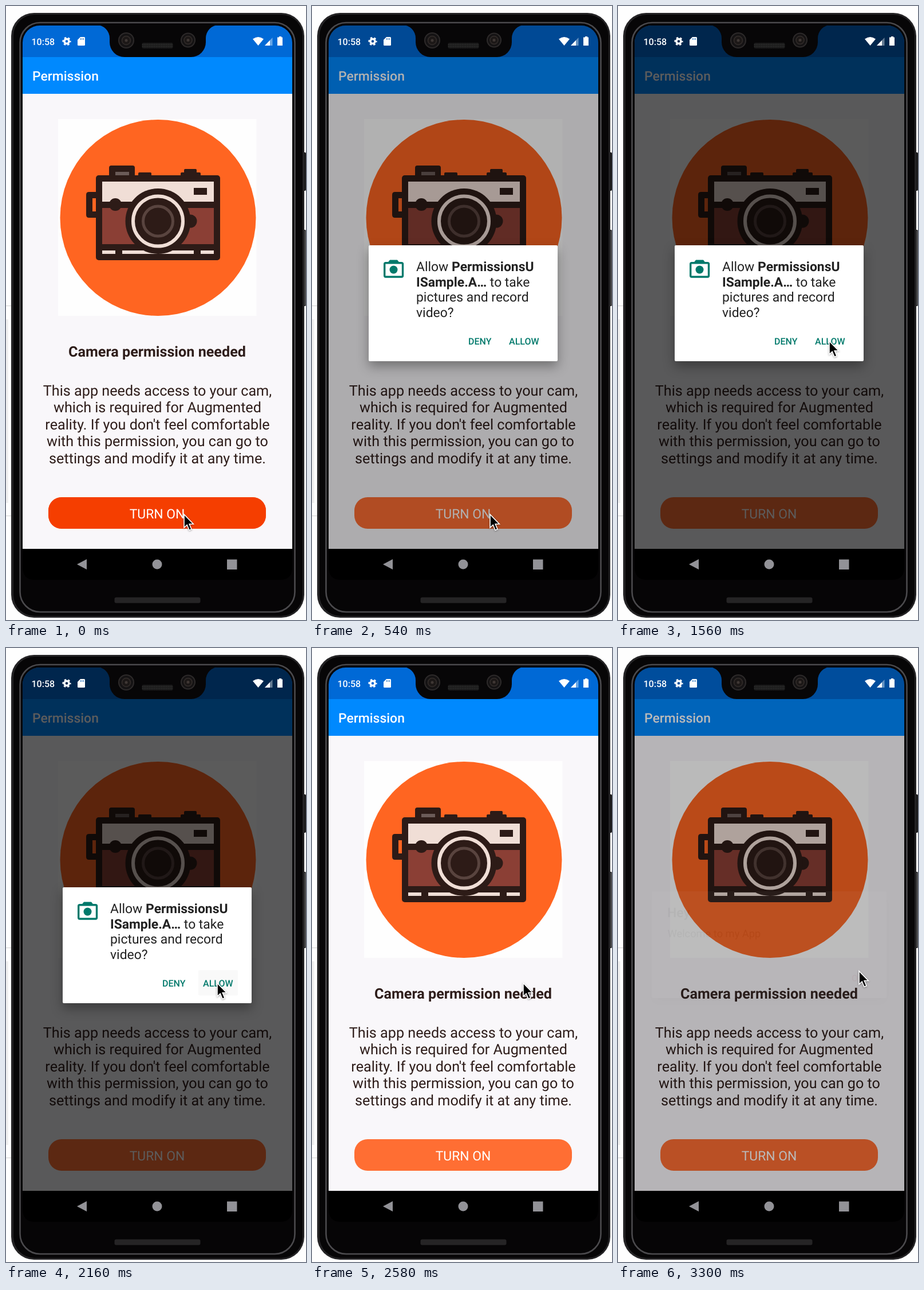
Write an HTML page that moves like this. It is 524 px wide and 1070 px high and loops after 3360 ms.

```html
<!DOCTYPE html>
<html lang="en">
<head>
<meta charset="utf-8">
<title>Camera permission</title>
<style>
  html, body { margin: 0; width: 100%; height: 100%; overflow: hidden; background: #fefefe; }
  svg { display: block; width: 524px; height: 1070px; font-family: Roboto, Arial, sans-serif; text-rendering: geometricPrecision; }
  .medium { font-weight: 500; }
  .bold { font-weight: 700; }
  .mid { text-anchor: middle; }
  .s16 { font-size: 16px; }
  .s18 { font-size: 18.3px; }
  .s23 { font-size: 22.9px; }
  .s25 { font-size: 25.18px; }
  .ink { fill: #2e1d1a; }
  .dark { fill: #2d1b17; }
  .cream { fill: #f0ded6; }
  .teal { fill: #00796b; }
  .card { fill: #fff; filter: drop-shadow(0 9px 10px rgba(0, 0, 0, .34)); }
</style>
</head>
<body>
<svg viewBox="0 0 524 1070" xmlns="http://www.w3.org/2000/svg">
  <defs>
    <clipPath id="screen"><path d="M29 946V64A30 30 0 0 1 59 34H470A30 30 0 0 1 500 64V946Z"/></clipPath>
    <pattern id="mesh" width="3" height="3" patternUnits="userSpaceOnUse">
      <rect width="3" height="3" fill="#1b1b1b"/><circle cx="1.5" cy="1.5" r=".8" fill="#383838"/>
    </pattern>
  </defs>

  <!-- window behind the phone -->
  <rect y="546" width="4" height="320" fill="#f0f0f0"/>
  <path d="M0 522.5H10M0 888.5H10" stroke="#d4d4d4"/>

  <!-- phone body -->
  <rect x="518" y="255" width="6" height="67" rx="2" fill="#1a1a1b"/>
  <rect x="518" y="390" width="6" height="133" rx="2" fill="#2c2c2e"/>
  <path d="M522.5 392V521" stroke="#6e6e70"/>
  <rect x="9" y="12" width="512" height="1054" rx="40" fill="#242325"/>
  <rect x="13" y="15" width="505" height="1048" rx="37" fill="#070607"/>
  <rect x="24.500" y="29" width="480" height="1027" rx="35" fill="#060506" stroke="#4b4a4d" stroke-width="2.600"/>

  <g clip-path="url(#screen)">
    <rect x="28" y="34" width="473" height="56" fill="#0069d6"/>
    <rect x="28" y="89" width="473" height="64" fill="#0089fe"/>
    <rect x="28" y="153" width="473" height="793" fill="#f9f7fa"/>
    <text class="medium s23" x="46" y="130" fill="#fff">Permission</text>

    <!-- camera picture -->
    <rect x="91" y="197" width="346.500" height="343" fill="#fefefe"/>
    <circle cx="265.500" cy="369" r="171" fill="#ff6521"/>
    <g class="dark">
      <path fill-rule="evenodd" d="M145 324H160V369H145Q140 369 140 364V329Q140 324 145 324ZM151 335V358H158V335Z"/>
      <rect x="180" y="278" width="45" height="24" rx="4"/>
      <rect x="231" y="290" width="23" height="10" rx="2"/>
      <rect x="305" y="290" width="35" height="10" rx="2"/>
      <rect x="311" y="284" width="22" height="10" rx="2"/>
      <rect x="157" y="295" width="217" height="148" rx="5"/>
    </g>
    <rect x="191" y="289" width="24" height="6" fill="#6b5b58"/>
    <rect class="cream" x="168" y="306" width="195" height="35"/>
    <rect x="168" y="352" width="195" height="63" fill="#8b3f35"/>
    <path d="M168 429H191M203 429H328M340 429H363" stroke="#f0ded6" stroke-width="6"/>
    <g class="dark">
      <rect x="328" y="317" width="23" height="12"/>
      <circle cx="191" cy="346" r="11"/>
      <circle cx="322" cy="375" r="11.500"/>
      <circle cx="265.500" cy="375" r="57"/>
    </g>
    <g fill="none" stroke-width="6">
      <circle cx="265.500" cy="375" r="43.500" stroke="#f0ded6"/>
      <circle cx="265.500" cy="375" r="26" stroke="#59443f" stroke-width="5"/>
    </g>

    <text class="bold s25 mid ink" x="264" y="611">Camera permission needed</text>
    <g id="body" class="s25 mid ink"></g>
    <rect x="74" y="856" width="380" height="55" rx="23" fill="#ff6e33"/>
    <rect id="press" x="74" y="856" width="380" height="55" rx="23" fill="#f53e00"/>
    <text class="s23 mid" x="264" y="893" fill="#fff">TURN ON</text>

    <rect id="shade" x="28" y="34" width="473" height="912"/>

    <g id="ask">
      <rect class="card" x="99" y="416.500" width="330" height="202" rx="2"/>
      <rect id="ripple" x="336" y="561" width="69" height="44" rx="2" fill="#f9f9f9"/>
      <path class="teal" d="M132 447L136 442H149L153 447Z"/>
      <rect x="126.700" y="447.200" width="31.800" height="24.300" rx="2" fill="none" stroke="#00796b" stroke-width="3.400"/>
      <circle class="teal" cx="142.500" cy="459" r="7"/>
      <g class="s23" fill="#212121">
        <text x="182" y="461">Allow <tspan class="bold">PermissionsU</tspan></text>
        <text x="182" y="488"><tspan class="bold">ISample.A…</tspan> to take</text>
        <text x="182" y="514.500">pictures and record</text>
        <text x="182" y="541.500">video?</text>
      </g>
      <g class="medium s16 teal">
        <text x="273" y="589">DENY</text>
        <text x="344" y="589">ALLOW</text>
      </g>
    </g>

    <g id="hello">
      <rect class="card" x="59" y="424" width="410" height="186" rx="2"/>
      <g fill="#212121">
        <text class="medium s23" x="86" y="469">Hey</text>
        <text class="s18" x="86.500" y="504">Welcome to my App</text>
      </g>
      <text class="medium s16" x="408" y="581" fill="#cf1b35">OK</text>
    </g>
  </g>

  <!-- status bar -->
  <g fill="#fff">
    <text class="medium s16" x="44.500" y="67.500">10:58</text>
    <circle cx="106" cy="61.500" r="4" fill="none" stroke="#fff" stroke-width="3.400"/>
    <circle cx="106" cy="61.500" r="6.400" fill="none" stroke="#fff" stroke-width="2.400" stroke-dasharray="3.400 3.300" stroke-dashoffset="1.700"/>
    <path d="M130 54H136.500Q138 54 138 55.500V67.500Q138 69 136.500 69H126.500Q125 69 125 67.500V59Z"/>
    <path d="M431 57.500Q440.500 50.500 450 57.500L440.500 69Z"/>
    <path d="M452 69L465.500 55V69Z" opacity=".4"/>
    <path d="M452 69L461 59.700V69Z"/>
    <path d="M477 53H481V54.500H483V69H474V54.500H477Z"/>
  </g>
  <path d="M130.500 56V59M133 56V59M135.500 56V59" stroke="#0058b0" stroke-width=".9"/>

  <!-- notch -->
  <path d="M158 33A23 23 0 0 1 181 56V63A26 26 0 0 0 207 89H323A26 26 0 0 0 349 63V56A23 23 0 0 1 372 33Z" fill="#070607"/>
  <g stroke="#2d2a2a" stroke-width="2" fill="#151314">
    <circle cx="210" cy="60" r="13"/><circle cx="318" cy="59.500" r="12"/>
  </g>
  <g stroke="#332d2b" stroke-width="1.500" fill="#1c1817">
    <circle cx="210" cy="60" r="7.500"/><circle cx="318" cy="59.500" r="7"/>
  </g>
  <circle cx="210" cy="60" r="2.500" fill="#3f3734"/>
  <circle cx="318" cy="59.500" r="2.500" fill="#3f3734"/>
  <rect x="237.500" y="64.500" width="54" height="9" rx="2" fill="url(#mesh)"/>

  <!-- navigation bar and chin -->
  <path d="M29 946H500V978Q500 1000 478 1000H51Q29 1000 29 978Z" fill="#000"/>
  <g fill="#929297">
    <path d="M124 973L141 964V982Z"/>
    <circle cx="264" cy="973" r="8.500"/>
    <rect x="386" y="964.500" width="17.500" height="17.500"/>
  </g>
  <rect x="189.500" y="1030.500" width="150" height="10" rx="3" fill="#252425"/>

  <path id="cursor" d="M0 0V23L5.200 18.300L9 27.500L13 25.800L9.200 16.800H16.300Z" fill="#000" stroke="#fff"
    stroke-width="1.600" style="filter:drop-shadow(0 1.500px 1.500px rgba(0,0,0,.35))"/>
</svg>
<script>
  const LOOP = 3360, STEP = 60, SHADE = 0.64;
  const $ = id => document.getElementById(id);

  const lines = [
    'This app needs access to your cam,',
    'which is required for Augmented',
    "reality. If you don't feel comfortable",
    'with this permission, you can go to',
    'settings and modify it at any time.'
  ];
  $('body').innerHTML = lines.map((line, i) =>
    `<text x="264.500" y="${679 + i * 29.45}">${line}</text>`).join('');

  // Each track holds [time, value] pairs.
  const tracks = {
    press: [[180, 1], [360, 0]],
    shade: [[420, 0], [540, .48], [600, .8], [660, 1], [2220, 1], [2340, .48], [2460, 0],
            [2700, 0], [2760, .3], [2820, .75], [2880, 1], [3180, 1], [3240, .8], [3300, .42], [3360, 0]],
    ask: [[420, 0], [540, 1], [2400, 1], [2460, 0]],
    drop: [[2220, .5], [2280, 60], [2340, 207.5], [2400, 400], [2460, 560]],
    ripple: [[2040, 0], [2160, 1]],
    hello: [[2700, 0], [2820, .6], [2880, 1], [3180, 1], [3240, .5], [3300, .03], [3360, 0]],
    toAllow: [[1080, 0], [1500, 1]],
    toOk: [[2940, 0], [3120, 1]]
  };

  function at(name, t) {
    const keys = tracks[name];
    const next = keys.findIndex(k => k[0] > t);
    if (next === 0) return keys[0][1];
    if (next < 0) return keys[keys.length - 1][1];
    const [t0, a] = keys[next - 1], [t1, b] = keys[next];
    return a + (b - a) * (t - t0) / (t1 - t0);
  }

  const ease = p => p * p * (3 - 2 * p);
  const fade = (id, value) => $(id).setAttribute('opacity', value);
  const move = (id, x, y) => $(id).setAttribute('transform', `translate(${x} ${y})`);

  function draw(t) {
    fade('press', at('press', t));
    fade('shade', at('shade', t) * SHADE);
    fade('ask', at('ask', t));
    move('ask', 0, at('drop', t));
    fade('ripple', at('ripple', t));
    fade('hello', at('hello', t));
    const a = ease(at('toAllow', t)), b = ease(at('toOk', t));
    move('cursor', 311 + 58 * a + 52 * b, 886 - 302 * a - 21 * b);
  }

  const start = performance.now();
  function tick() {
    const t = (performance.now() - start) % LOOP;
    draw(Math.floor(t / STEP) * STEP);
    requestAnimationFrame(tick);
  }
  draw(0);
  tick();
</script>
</body>
</html>
```
